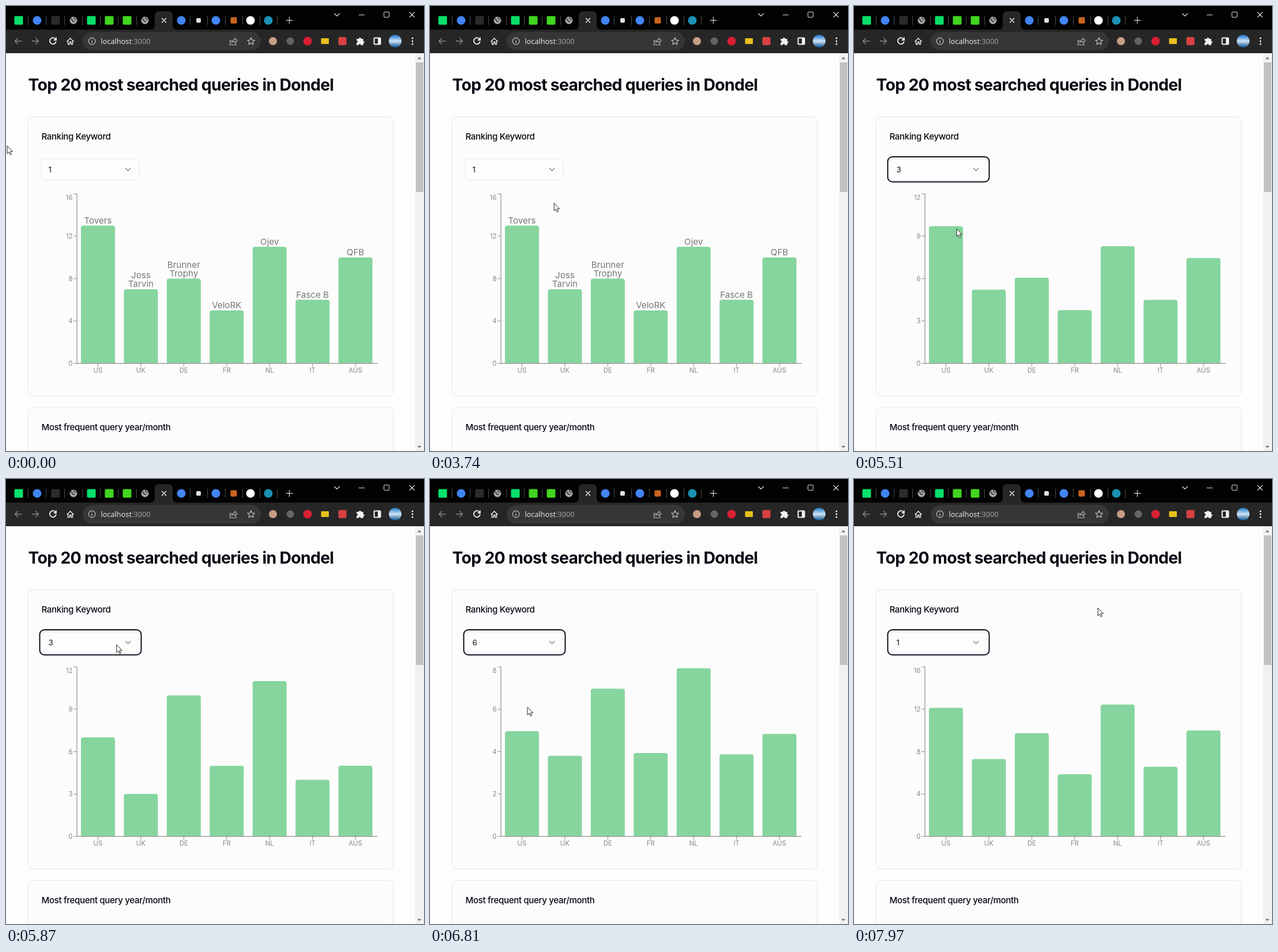
Recreate the animation shown at these times as an HTML page. Size 725 by 773 pixels, loop 8 s.

```html
<!DOCTYPE html>
<html lang="en">
<head>
<meta charset="utf-8">
<title>Query rankings</title>
<style>
html, body { margin: 0; width: 100%; height: 100%; overflow: hidden; background: #fdfdfd; }
svg { display: block; font-family: Inter, sans-serif; }
.line { fill: none; stroke-width: 1.4; stroke-linecap: round; stroke-linejoin: round; }
</style>
</head>
<body>
<svg id="stage" width="725" height="773" viewBox="0 0 725 773">
  <defs>
    <linearGradient id="sky" x2="0" y2="1">
      <stop offset="0" stop-color="#1673c4"/><stop offset=".5" stop-color="#cfe6f5"/><stop offset="1" stop-color="#0d4f92"/>
    </linearGradient>
    <filter id="shadow" x="-10%" y="-10%" width="120%" height="120%">
      <feDropShadow dx="0" dy="3" stdDeviation="2.5" flood-opacity=".14"/>
    </filter>
  </defs>
  <g id="page"></g>
  <g id="live"></g>
  <g id="browser"></g>
  <path id="cursor" d="M0 0V13.5L3.1 10.6L5.2 15.4L7.3 14.5L5.3 9.8H9.5Z" fill="#fff" stroke="#222"/>
</svg>
<script>
const LOOP = 8000;
const BASE = 620.8, HEIGHT = 294.5, ROW = 30.33;
const COUNTRIES = ['US', 'UK', 'DE', 'FR', 'NL', 'IT', 'AUS'];
const RANKS = {
  1: { max: 16, values: [13, 7, 8, 5, 11, 6, 10],
       labels: ['Tovers', 'Joss|Tarvin', 'Brunner|Trophy', 'VeloRK', 'Ojev', 'Fasce B', 'QFB'] },
  3: { max: 12, values: [7, 3, 10, 5, 11, 4, 5],
       labels: ['Pellows', 'Desk of|Orvland|lease|quote', 'KQW', 'Dorva', 'Haverdoom', 'Tovers', 'QFB'] },
  6: { max: 8, values: [5, 4, 7, 4, 8, 4, 5],
       labels: ['Mantics', 'Fanders', 'Silverfell', 'Leonhard|Morby', '', 'Indiscrezioni|Valle|Sorda', 'Milos|Drankovic'] }
};
// each pick: menu opens, choice is made, chosen rank
const PICKS = [[4740, 5500, 3], [5950, 6560, 6], [7140, 7803, 1]];
const POINTER = [
  [0, 2, 243], [300, 2, 243], [570, 7, 240], [2300, 7, 240], [3100, 170, 330], [3200, 180, 335],
  [3370, 180, 335], [3500, 200, 345], [3640, 200, 345], [3840, 230, 340], [4070, 230, 340],
  [4600, 183, 278], [4950, 183, 278], [5420, 178, 387], [5540, 178, 387], [5900, 192, 286],
  [6140, 192, 286], [6480, 172, 478], [6600, 172, 478], [7080, 165, 279], [7280, 165, 279],
  [7620, 160, 327], [7800, 160, 327], [7960, 423, 224], [LOOP, 423, 224]
];

const $ = id => document.getElementById(id);
const clamp = x => Math.max(0, Math.min(1, x));
const smooth = x => x * x * (3 - 2 * x);

// CSS "ease": cubic-bezier(.25, .1, .25, 1)
function ease(x) {
  if (x <= 0 || x >= 1) return clamp(x);
  const curve = (s, a, b) => 3 * a * s * (1 - s) ** 2 + 3 * b * s * s * (1 - s) + s ** 3;
  let lo = 0, hi = 1;
  for (let i = 0; i < 20; i++) {
    const mid = (lo + hi) / 2;
    if (curve(mid, .25, .25) < x) lo = mid; else hi = mid;
  }
  return curve(lo, .1, 1);
}

// y is the middle of the capital letters
const text = (x, y, str, size, fill = '#0b0f1a', attrs = '') =>
  `<text x="${x}" y="${y + .364 * size}" font-size="${size}" fill="${fill}" ${attrs}>${str}</text>`;
const heading = (x, y, str, size, weight) =>
  text(x, y, str, size, '#060a14', `font-weight="${weight}" letter-spacing="${-.025 * size}"`);
const rect = (x, y, w, h, r, fill, attrs = '') =>
  `<rect x="${x}" y="${y}" width="${w}" height="${h}" rx="${r}" fill="${fill}" ${attrs}/>`;
const circle = (x, y, r, fill, attrs = '') => `<circle cx="${x}" cy="${y}" r="${r}" fill="${fill}" ${attrs}/>`;
const line = (d, stroke, width = 1.4) => `<path class="line" d="${d}" stroke="${stroke}" style="stroke-width:${width}"/>`;
const square = (x, y, size, fill) => rect(x - size / 2, y - size / 2, size, size, 2, fill);
const border = 'stroke="#dfe7ee"';

function drawPage() {
  return rect(0, 81, 725, 692, 0, '#fdfdfd') +
    heading(38.5, 137, 'Top 20 most searched queries in Dondel', 28.4, 700) +
    rect(38.5, 192.5, 633, 485, 8, '#fcfcfc', border) +
    rect(38.5, 697, 633, 200, 8, '#fcfcfc', border) +
    heading(61.5, 226.5, 'Ranking Keyword', 15.15, 500) +
    heading(61.5, 731, 'Most frequent query year/month', 15.15, 500);
}

function drawBrowser() {
  const white = '#f2f2f2', grey = '#8a8a8a';
  const globe = x => circle(x, 25, 6.5, '#a5a8ac') +
    line(`M${x - 5} 22q3 1 3 3t4 2M${x + 1} 20q-1 3 4 3`, '#222');
  let out = rect(0, 0, 725, 42, 0, '#020202') + rect(0, 41, 725, 41, 0, '#262626') +
    '<path d="M250 41q8 0 8-8V17q0-8 8-8H281q8 0 8 8V33q0 8 8 8Z" fill="#262626"/>';
  for (const x of [38, 69, 101, 132, 163, 194, 226, 319, 349, 380, 410, 440, 470])
    out += rect(x, 17, 1, 16, 0, '#4a4a4a');
  for (const [x, fill] of [[22, '#08e06a'], [86, '#2a2a2a'], [148, '#08e06a'], [179, '#42d61f'], [210, '#42d61f']])
    out += square(x, 25, 15, fill);
  for (const [x, fill] of [[54, '#4285f4'], [304, '#4285f4'], [364, '#4285f4'], [424, '#fff'], [455, '#1b91b5']])
    out += circle(x, 25, 7.5, fill);
  out += globe(117) + globe(241) + square(334, 25, 8, '#ddd') + square(395, 25, 11, '#c9661f');
  out += line('M270.5 21.5l7 7m0-7l-7 7', '#fff') + line('M486 25h11M491.5 19.5v11', '#bbb') +
    line('M569.5 13l4.5 4.5 4.5-4.5M612 15.5h9.5M700 11l8.5 8.5m0-8.5l-8.5 8.5', '#ddd', 1.1) +
    rect(655.5, 10.5, 9, 9, 1.5, 'none', 'stroke="#ddd"');
  // navigation and address bar
  out += line('M27 61H15.5m5-5l-5 5 5 5M45 61H56.5m-5-5l5 5-5 5', grey) +
    line('M86 57.5a5.5 5.5 0 1 0 .8 4.5M87 55.5v3.5h-3.5', white, 1.8) +
    line('M106 61.5l5.5-5.5 5.5 5.5M107.5 61v5.5h3v-4h2.5v4h2.5v-5.5', white) +
    rect(133, 45, 309, 32, 16, '#363636') + circle(149, 61, 5.8, 'none', 'stroke="#bbb" stroke-width="1.3"') +
    line('M149 60.5v3.5M149 58v.1', '#bbb') +
    text(164.5, 61, 'localhost<tspan fill="#a5a5a5">:3000</tspan>', 12.75, white, 'font-family="Open Sans, sans-serif"') +
    line('M391 59.5h-2.5v8h10.5v-3M391 64q1-5 6-5.5v-3l4 4.5-4 4v-2.5q-4 0-6 2.5', '#bbb', 1.1) +
    line('M425 55l1.8 4 4.4.4-3.3 3 1 4.3-3.9-2.3-3.9 2.3 1-4.3-3.3-3 4.4-.4z', '#ccc', 1.2);
  // toolbar buttons
  out += circle(463, 61, 7, '#c99d86') + circle(493, 61, 6.5, '#656565') + circle(523, 61, 7.5, '#d81f34') +
    rect(546.5, 56, 13.5, 10, 1, '#e8c21c') + square(583.5, 61, 14, '#d84242') +
    '<path d="M608 57h4a2 2 0 1 1 4 0h3.5v4a2 2 0 1 1 0 4v3h-4a2 2 0 1 0-4 0H608v-4a2 2 0 1 0 0-4z" fill="#f2f2f2"/>' +
    rect(638.5, 55.5, 11, 11, 1, 'none', 'stroke="#f2f2f2" stroke-width="2"') + rect(645, 55, 5, 12, 0, white) +
    circle(675, 61, 11, 'url(#sky)');
  for (const y of [56, 61, 66]) out += circle(705, y, 1.5, white);
  return out;
}

function drawScrollbar() {
  return rect(710, 82, 15, 691, 0, '#f1f1f1') + rect(711, 98, 13, 225, 0, '#c1c1c1') +
    '<path d="M713.5 92.5h7l-3.5-4zM713.5 764h7l-3.5 4z" fill="#777"/>';
}

function drawChart(rank, previous, progress) {
  const { max, values, labels } = RANKS[rank], old = RANKS[previous];
  const axis = '#8f8f8a';
  let out = '';
  values.forEach((value, i) => {
    const from = old.values[i] / old.max, to = value / max;
    const x = 130 + 74.43 * i, mid = x + 29.5, top = BASE - HEIGHT * (from + (to - from) * progress);
    out += `<path d="M${x} ${BASE}V${top + 4}q0-4 4-4h51q4 0 4 4V${BASE}z" fill="#86d59e"/>`;
    if (progress === 1) labels[i].split('|').reverse().forEach((word, k) => {
      out += text(mid, top - 9.2 - 15.15 * k, word, 15.15, '#777', 'text-anchor="middle"');
    });
    out += line(`M${mid} ${BASE}v6`, axis, 1) +
      text(mid, 632.5, COUNTRIES[i], 11.4, '#888', 'text-anchor="middle"');
  });
  for (let i = 0; i <= 4; i++) {
    const y = BASE - HEIGHT * i / 4;
    out += line(`M117.5 ${y}h5.5`, axis, 1) +
      text(115.5, i === 4 ? y + 6.5 : y, max * i / 4, 11.4, '#888', 'text-anchor="end"');
  }
  return out + line(`M123 ${BASE - HEIGHT}V${BASE}H644`, axis, 1.2);
}

function drawSelect(rank, focused) {
  return (focused ? rect(58.5, 262, 176, 43.5, 8, '#fff', 'stroke="#0b0f1a" stroke-width="2"') : '') +
    rect(61.5, 265.5, 170, 37, 6, '#fdfdfd', border) + text(73.5, 284.5, rank, 13.3) +
    line('M207.5 282l4.2 4 4.2-4', '#777', 1.2);
}

function drawMenu(rank, pointerY, progress) {
  const hovered = pointerY < 312 ? rank - 1 : Math.floor((pointerY - 312) / ROW);
  const scale = .95 + .05 * progress;
  let rows = rect(66, 312 + ROW * hovered, 162.5, ROW, 3, '#eef3f7');
  for (let i = 0; i < 14; i++) rows += text(96.5, 327 + ROW * i, i + 1, 13.3, '#1a1e2a');
  const y = 327 + ROW * (rank - 1);
  return `<g opacity="${progress}" transform="translate(147 268) scale(${scale}) translate(-147 -268)">` +
    rect(62, 307, 170.5, 433.5, 6, '#fdfdff', border + ' filter="url(#shadow)"') + rows +
    line(`M76 ${y + .5}l3 3 6.5-6.5`, '#1a1e2a') + '</g>';
}

function pointerAt(t) {
  const i = POINTER.findIndex(p => p[0] > t), [t0, x0, y0] = POINTER[i - 1], [t1, x1, y1] = POINTER[i];
  const k = smooth((t - t0) / (t1 - t0));
  return [x0 + (x1 - x0) * k, y0 + (y1 - y0) * k];
}

function draw(t) {
  const [x, y] = pointerAt(t);
  const done = PICKS.filter(p => p[1] <= t);
  const [, since, rank] = done.at(-1) || [0, -LOOP, 1];
  const previous = done.length > 1 ? done.at(-2)[2] : 1;
  const open = PICKS.find(p => p[0] <= t && t < p[1]);
  $('live').innerHTML = drawChart(rank, previous, ease((t - since) / 400)) +
    drawSelect(rank, done.length && !open) +
    (open ? drawMenu(rank, y, ease((t - open[0]) / 150)) : drawScrollbar());
  $('cursor').setAttribute('transform', `translate(${x} ${y})`);
}

$('page').innerHTML = drawPage();
$('browser').innerHTML = drawBrowser();
(function frame() {
  draw(performance.now() % LOOP);
  requestAnimationFrame(frame);
})();
</script>
</body>
</html>
```
